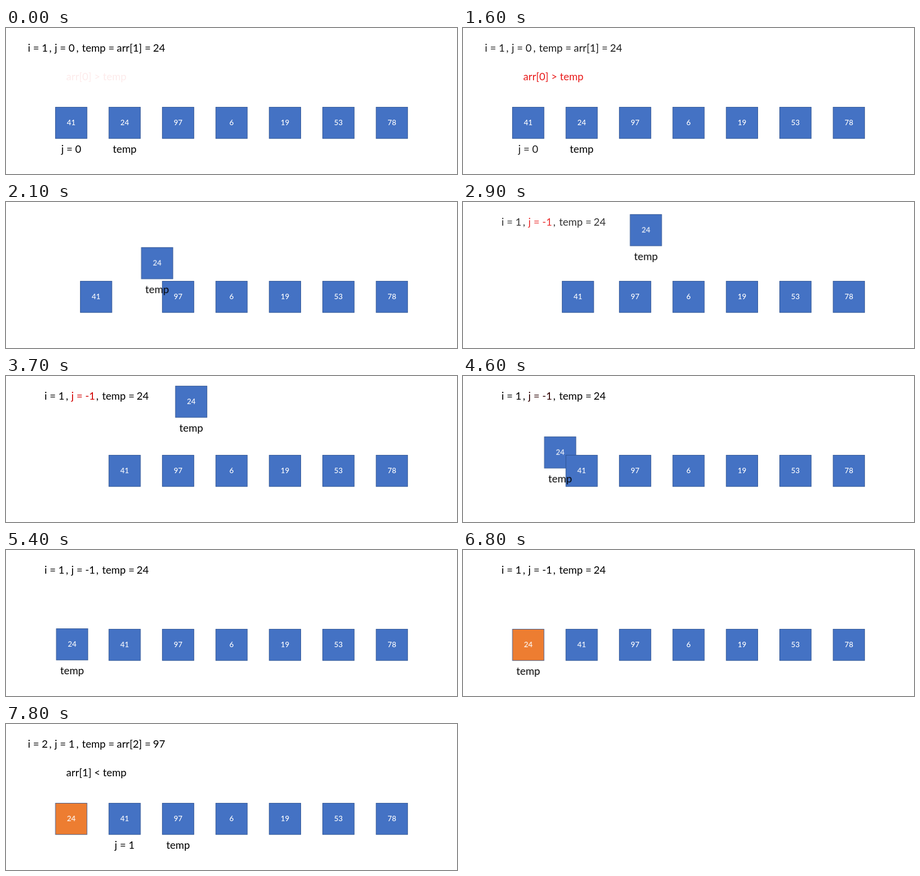
An HTML page that plays this animation: 908 by 296 pixels, repeating every 8000 ms.

```html
<!DOCTYPE html>
<html lang="en">
<head>
<meta charset="utf-8">
<title>Insertion sort</title>
<style>
  html, body { margin: 0; width: 100%; height: 100%; overflow: hidden; background: #fff; }
  svg { display: block; width: 908px; height: 296px; }
  text { font: 21px Lato, Carlito, sans-serif; fill: #000; white-space: pre; }
  .mid { text-anchor: middle; }
  .num { font-size: 15px; font-weight: 500; fill: #fff; text-anchor: middle; }
  rect { fill: #4472c4; stroke: #2f528f; stroke-width: 1; }
  .red { fill: #e60000; }
</style>
</head>
<body>
<svg id="stage" viewBox="0 0 908 296"></svg>
<script>
const LOOP = 8000, STEP = 107.6, SIZE = 63.5, ROW = 192.3;
const DECEL = 'cubic-bezier(.3333, .6667, .6667, 1)';
const stage = document.getElementById('stage');
const slot = i => 131.3 + STEP * i;

function add(parent, tag, attrs = {}, content) {
  const el = document.createElementNS('http://www.w3.org/2000/svg', tag);
  for (const key in attrs) el.setAttribute(key, attrs[key]);
  if (content !== undefined) el.textContent = content;
  return parent.appendChild(el);
}

// steps: [ms, value, easing towards the next step]
function play(el, prop, steps) {
  const all = [[0, steps[0][1]], ...steps, [LOOP, steps.at(-1)[1]]];
  el.animate(
    all.map(([ms, value, easing = 'linear']) => ({ offset: ms / LOOP, [prop]: value, easing })),
    { duration: LOOP, iterations: Infinity });
  return el;
}

const fade = (el, ...steps) => play(el, 'opacity', steps);

function box(i, value) {
  const g = add(stage, 'g');
  add(g, 'rect', { x: slot(i) - SIZE / 2, y: ROW - SIZE / 2, width: SIZE, height: SIZE });
  add(g, 'text', { class: 'num', x: slot(i), y: ROW + 5 }, value);
  return g;
}

const label = (parent, i, str) =>
  add(parent, 'text', { class: 'mid', x: slot(i), y: 253.3 }, str);

const compare = (parent, str) =>
  add(parent, 'text', { class: 'mid', x: 182, y: 106.3 }, str);

const line = (parent, parts) =>
  parts.map(([x, str]) => add(parent, 'text', { x, y: 48.3 }, str));

const status = (parent, i, j, value) => line(parent, [
  [44, `i = ${i}`], [87, ','], [98, `j = ${j}`], [141.5, ','],
  [153, 'temp ='], [223, `arr[${i}] =`], [296, value]]);

// Boxes: the held value lies under the others
const held = box(1, 24);
const shifted = box(0, 41);
[97, 6, 19, 53, 78].forEach((value, i) => box(i + 2, value));

// First comparison
const first = add(stage, 'g');
status(first, 1, 0, 24);
label(first, 0, 'j = 0');
fade(first, [1550, 1], [2050, 0]);
const greater = compare(first, 'arr[0] > temp');
greater.classList.add('red');
fade(greater, [0, .08], [460, 1]);

// State after the shift
const second = add(stage, 'g');
const parts = line(second, [
  [77.5, 'i = 1'], [120.5, ','], [131.5, 'j = -1'], [181.5, ','], [193.5, 'temp ='], [263, 24]]);
fade(second, [2500, 0], [3000, 1], [7100, 1], [7800, 0]);
play(parts[2], 'fill', [[3600, '#e60000'], [4850, '#000']]);

// Lift the held value, shift its neighbour, drop it into the gap
const heldLabel = label(stage, 1, 'temp');
for (const el of [held, heldLabel]) {
  play(el, 'transform', [
    [1670, 'translate(0px, 0px)', DECEL],
    [3190, 'translate(134.2px, -140.3px)'],
    [3700, 'translate(134.2px, -140.3px)', DECEL],
    [5560, `translate(${-STEP}px, 0px)`]]);
}
play(shifted, 'transform', [
  [1640, 'translate(0px, 0px)', DECEL],
  [3354, `translate(${STEP}px, 0px)`]]);
play(held.firstChild, 'fill', [[5930, '#4472c4'], [6100, '#ed7d31']]);
fade(heldLabel, [7100, 1], [7800, 0]);

// Next round
const next = add(stage, 'g');
status(next, 2, 1, 97);
compare(next, 'arr[1] < temp');
label(next, 1, 'j = 1');
label(next, 2, 'temp');
fade(next, [7100, 0], [7800, 1]);
</script>
</body>
</html>
```
